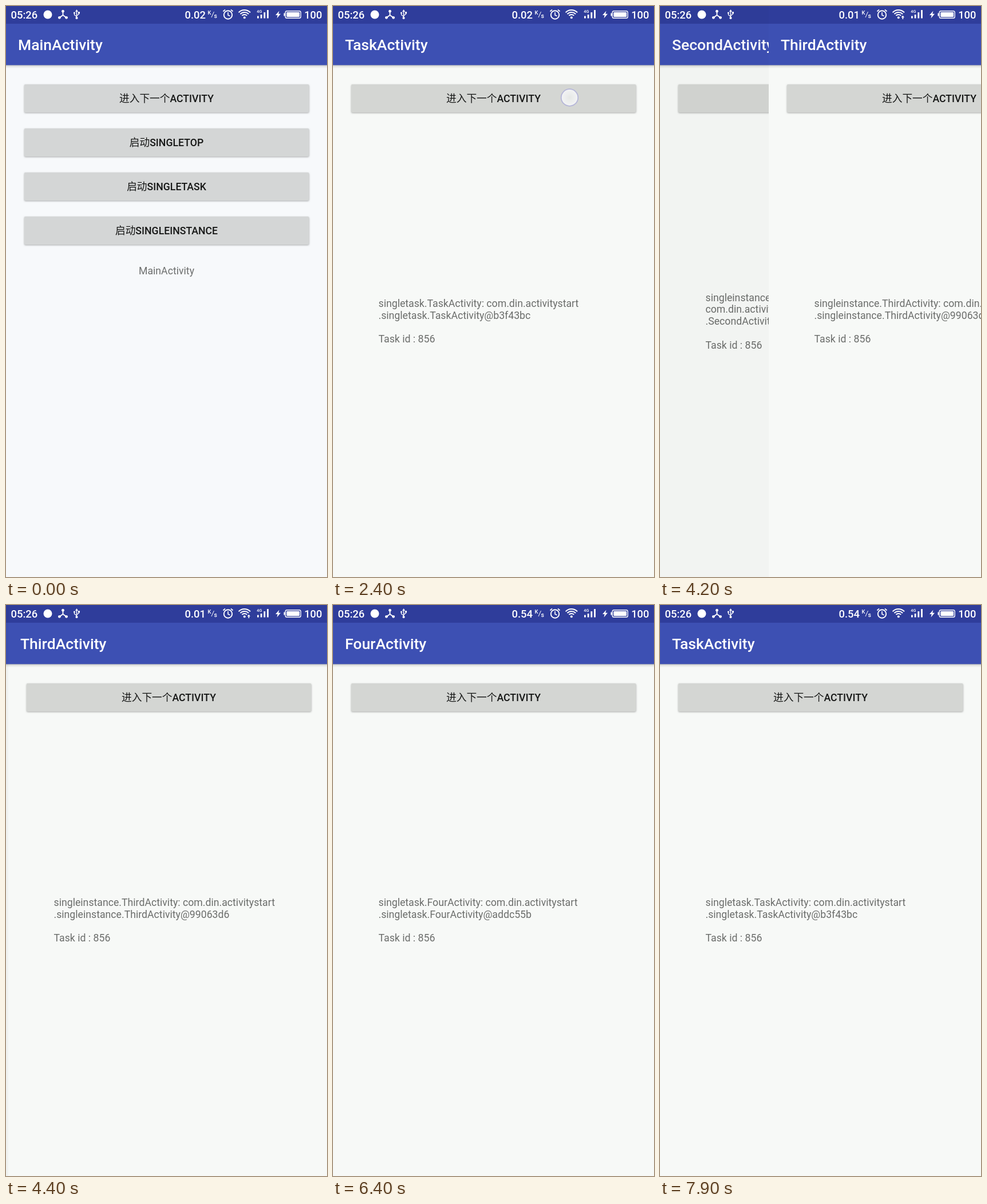
These frames come from a looping animation (561x998 px, 8 s). An HTML page with a canvas:

```html
<!DOCTYPE html>
<html lang="zh">
<head>
<meta charset="utf-8">
<title>Activity launch modes</title>
<style>
html, body { margin: 0; width: 100%; height: 100%; overflow: hidden; background: #f7f9f7; }
canvas { display: block; width: 561px; height: 998px; }
</style>
</head>
<body>
<canvas id="stage" width="561" height="998"></canvas>
<script>
const W = 561, H = 998, LOOP = 8000, STEP = 100, SLIDE = 400;
const ctx = document.getElementById('stage').getContext('2d');
const FONT = 'Roboto, "Noto Sans CJK SC", "Noto Sans CJK", sans-serif';
const NEXT = '进入下一个ACTIVITY';

const detail = (title, ...lines) => ({
  title, bg: '#f7f9f7', button: '#d4d6d3', buttons: [NEXT], lines: [...lines, '', 'Task id : 856']
});

const screens = {
  main: {
    title: 'MainActivity', bg: '#f7f9fb', button: '#d4d6d6',
    buttons: [NEXT, '启动SINGLETOP', '启动SINGLETASK', '启动SINGLEINSTANCE'],
    caption: 'MainActivity', lines: []
  },
  task: detail('TaskActivity', 'singletask.TaskActivity: com.din.activitystart', '.singletask.TaskActivity@b3f43bc'),
  second: detail('SecondActivity', 'singleinstance.SecondActivity:', 'com.din.activitystart.singleinstance', '.SecondActivity@5c1e07a'),
  third: detail('ThirdActivity', 'singleinstance.ThirdActivity: com.din.activitystart', '.singleinstance.ThirdActivity@99063d6'),
  four: detail('FourActivity', 'singletask.FourActivity: com.din.activitystart', '.singletask.FourActivity@addc55b')
};

const moves = [
  { at: 1233, from: 'main', to: 'task' },
  { at: 2545, from: 'task', to: 'second' },
  { at: 4033, from: 'second', to: 'third' },
  { at: 5830, from: 'third', to: 'four' },
  { at: 7090, from: 'four', to: 'task', back: true }
];

const taps = [
  { at: 1000, x: 402, y: 315, row: 2 },
  { at: 2400, x: 413.5, y: 160, row: 0 },
  { at: 3700, x: 405, y: 158, row: 0 },
  { at: 5500, x: 397, y: 156, row: 0 },
  { at: 6900, x: 400, y: 158, row: 0 }
];

function text(str, x, y, size, color, weight = 400, align = 'left') {
  ctx.font = `${weight} ${size}px ${FONT}`;
  ctx.textAlign = align;
  ctx.fillStyle = color;
  ctx.fillText(str, x, y);
}

function rect(x, y, w, h, color) {
  ctx.fillStyle = color;
  ctx.fillRect(x, y, w, h);
}

function disc(x, y, r) {
  ctx.beginPath();
  ctx.arc(x, y, r, 0, Math.PI * 2);
  ctx.fill();
}

function line(width, ...points) {
  ctx.lineWidth = width;
  ctx.beginPath();
  points.forEach(([x, y]) => ctx.lineTo(x, y));
  ctx.stroke();
}

function polygon(...points) {
  ctx.beginPath();
  points.forEach(([x, y]) => ctx.lineTo(x, y));
  ctx.fill();
}

function drawButton(label, y, color, pressed) {
  ctx.save();
  ctx.shadowColor = pressed ? 'rgba(0,0,0,.4)' : 'rgba(0,0,0,.32)';
  ctx.shadowBlur = pressed ? 6 : 3;
  ctx.shadowOffsetY = pressed ? 2 : 1;
  ctx.fillStyle = pressed ? '#c8cac7' : color;
  ctx.beginPath();
  ctx.roundRect(32, y, 497.5, 49, 2);
  ctx.fill();
  ctx.restore();
  text(label, W / 2, y + 31.3, 17.7, '#161716', 500, 'center');
}

function drawScreen(screen, offset, pressedRow) {
  ctx.save();
  ctx.translate(offset, 0);
  rect(0, 0, W, H, screen.bg);

  const shade = ctx.createLinearGradient(0, 103, 0, 109);
  shade.addColorStop(0, 'rgba(0,0,0,.26)');
  shade.addColorStop(.4, 'rgba(0,0,0,.09)');
  shade.addColorStop(1, 'rgba(0,0,0,0)');
  rect(0, 103, W, 6, shade);
  rect(0, 0, W, 31, '#2f3d9b');
  rect(0, 31, W, 72.3, '#3d50b3');
  text(screen.title, 21, 76.5, 26.5, '#fff', 500);

  screen.buttons.forEach((label, i) =>
    drawButton(label, 137 + 77 * i, screen.button, i === pressedRow));
  if (screen.caption) text(screen.caption, W / 2, 469.4, 17.7, '#6c6e6d', 400, 'center');
  const top = 567.5 - screen.lines.length * 10.37;
  screen.lines.forEach((str, i) => text(str, 79.5, top + i * 20.74, 17.7, '#6b6d6b'));
  ctx.restore();
}

function drawStatus(speed, uploading) {
  text('05:26', 8.5, 21.5, 18.4, '#fff', 500);
  text(speed, 312.5, 21.5, 18.4, '#fff', 500);
  text('100', 552.5, 21.5, 18.4, '#fff', 500, 'right');
  text('K', 352.5, 15, 9.5, '#fff', 500);
  text('s', 363.5, 21, 10.5, '#fff', 500);
  ctx.strokeStyle = ctx.fillStyle = '#fff';
  line(1, [359, 20], [363.5, 10]);

  disc(73, 15, 7.5);

  // Connected nodes
  for (const [x, y] of [[99.5, 9.2], [93.4, 20.3], [105.6, 20.3]]) {
    line(1.8, [99.5, 16], [x, y]);
    disc(x, y, 2.4);
  }

  // USB connection
  line(1.5, [123.5, 9], [123.5, 21]);
  polygon([121, 10], [123.5, 6], [126, 10]);
  disc(123.5, 21, 2.1);
  line(1.3, [119.5, 12], [119.5, 15.5], [123.5, 18.5]);
  line(1.3, [127.5, 11.5], [127.5, 14], [123.5, 17]);
  disc(119.5, 12, 1.6);
  rect(126, 10.2, 3, 3, '#fff');

  // Alarm
  ctx.lineWidth = 1.9;
  ctx.beginPath();
  ctx.arc(388, 15.5, 7.2, 0, Math.PI * 2);
  ctx.stroke();
  line(1.6, [388, 11], [388, 16], [391.5, 17.5]);
  line(1.8, [379.5, 9.5], [383, 6.3]);
  line(1.8, [393, 6.3], [396.5, 9.5]);

  // Wi-Fi
  for (const r of [6, 10, 14]) {
    ctx.lineWidth = 2;
    ctx.beginPath();
    ctx.arc(416.8, 21, r, -Math.PI * .76, -Math.PI * .24);
    ctx.stroke();
  }
  disc(416.8, 20.3, 2);
  if (uploading) {
    polygon([421.5, 20], [424.3, 16.5], [427, 20]);
    rect(423.5, 19, 1.7, 4, '#fff');
  }

  // Signal
  text('4G', 438.3, 12.3, 7.2, '#fff', 500);
  [4, 6.5, 10.5, 14.5].forEach((h, i) => rect(439 + i * 5.7, 21.5 - h, 2.8, h, '#fff'));

  // Battery
  polygon([477.5, 8.5], [471, 16], [474.7, 16], [473.5, 21.5], [480, 13.8], [476.2, 13.8]);
  ctx.lineWidth = 1.4;
  ctx.beginPath();
  ctx.roundRect(488.2, 8.7, 27, 12.6, 2.8);
  ctx.stroke();
  rect(485.5, 12.5, 2, 5, '#fff');
  ctx.beginPath();
  ctx.roundRect(490.3, 10.8, 22.8, 8.4, 1.2);
  ctx.fill();
}

function drawTouch({ x, y }) {
  const glow = ctx.createRadialGradient(x, y, 0, x, y, 15);
  glow.addColorStop(0, '#e6e8e6');
  glow.addColorStop(1, '#f3f4f5');
  ctx.fillStyle = glow;
  disc(x, y, 15);
  ctx.strokeStyle = '#b5b6d8';
  ctx.lineWidth = 1.8;
  ctx.beginPath();
  ctx.arc(x, y, 14.8, 0, Math.PI * 2);
  ctx.stroke();
}

function draw(t) {
  const move = moves.findLast(m => t >= m.at);
  const progress = move ? Math.min(1, (t - move.at) / SLIDE) : 1;
  const tap = taps.find(p => t >= p.at && t < p.at + 300);
  const pressed = tap && t >= tap.at + 100 ? tap.row : -1;

  if (!move || progress === 1) {
    drawScreen(screens[move ? move.to : 'main'], 0, pressed);
  } else {
    const left = W * (1 - progress) ** 2;
    const under = screens[move.back ? move.to : move.from];
    const over = screens[move.back ? move.from : move.to];
    drawScreen({ ...under, bg: '#f7f9f7' }, 0, move.back ? -1 : pressed);
    if (!move.back) rect(0, 0, W, H, `rgba(0,0,0,${.028 * (1 - left / W)})`);
    drawScreen(over, Math.round(move.back ? W - left : left), -1);
  }

  drawStatus(t < 3200 ? '0.02' : t < 6000 ? '0.01' : '0.54', t >= 4000 && t < 4500);
  if (tap && t < tap.at + 200) drawTouch(tap);
}

const start = performance.now();
function frame() {
  const t = (performance.now() - start) % LOOP;
  draw(Math.floor(t / STEP) * STEP);
  requestAnimationFrame(frame);
}
frame();
</script>
</body>
</html>
```
